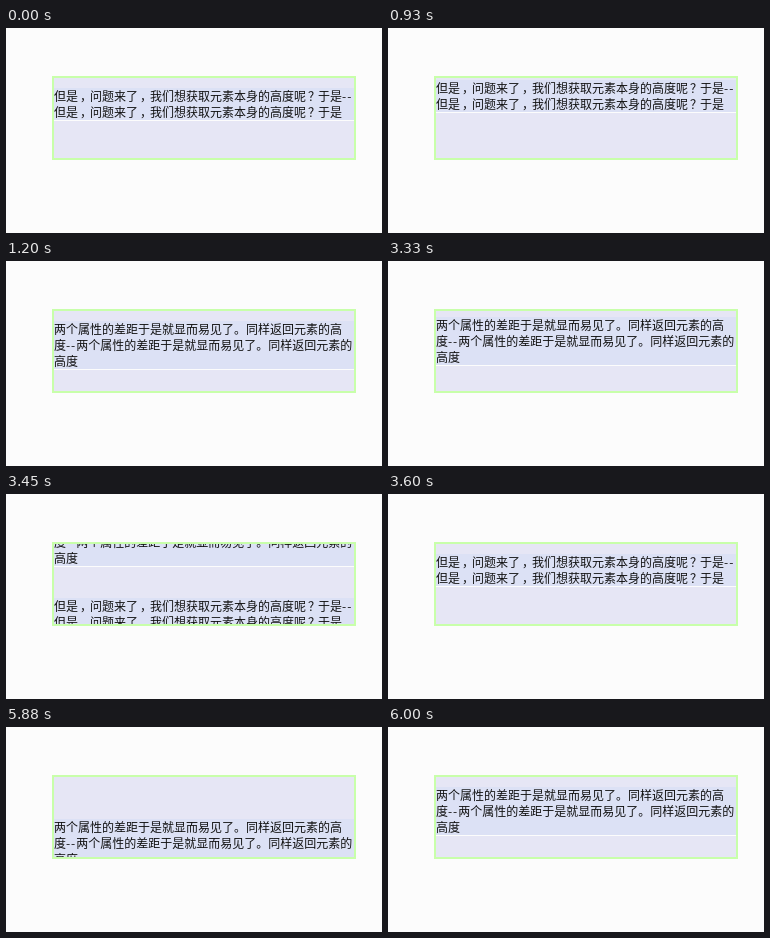
Recreate the animation shown at these times as an HTML page. Size 376 by 205 pixels, loop 8000 ms.

```html
<!DOCTYPE html>
<html lang="zh-CN">
<head>
<meta charset="utf-8">
<style>
html, body { margin: 0; width: 100%; height: 100%; overflow: hidden; background: #fcfcfc; }
#box {
  position: absolute; left: 46px; top: 48px; width: 300px; height: 80px;
  border: 2px solid #c8ffaa; background: #e6e6f5; overflow: hidden;
}
.item {
  position: absolute; left: 0; top: 10px; width: 300px;
  background: #dce1f5; border-bottom: 1px solid #fcfcfc; color: #111;
  font: 12px/16px "Noto Sans CJK SC", "Noto Sans CJK", sans-serif; white-space: pre;
}
.item i { font-style: normal; letter-spacing: .9px; }
/* Punctuation sits near the middle of its cell */
.item span { position: relative; left: 2px; }
</style>
</head>
<body>
<div id="box">
<div class="item">但是，问题来了，我们想获取元素本身的高度呢？于是<i>--</i>
但是，问题来了，我们想获取元素本身的高度呢？于是</div>
<div class="item">两个属性的差距于是就显而易见了。同样返回元素的高
度<i>--</i>两个属性的差距于是就显而易见了。同样返回元素的
高度</div>
</div>
<script>
const LOOP = 8000, TICK = 30, STEPS = 10, HEIGHT = 80;
const items = document.querySelectorAll('.item');
for (const item of items) {
  item.innerHTML = item.innerHTML.replace(/[，？]/g, '<span>$&</span>');
}
// Each scroll: start time and the distance of its first step
const scrolls = [[930, 8], [3330, 4], [5730, 4]];

function scrolled(t, [start, first]) {
  if (t < start) return 0;
  const k = Math.min(Math.floor((t - start) / TICK), STEPS - 1);
  return Math.round((first + (HEIGHT - first) * k / (STEPS - 1)) / 4) * 4;
}

function draw(now) {
  const t = now % LOOP;
  const total = scrolls.reduce((sum, s) => sum + scrolled(t, s), 0);
  const current = Math.floor(total / HEIGHT) % 2;
  const shift = total % HEIGHT;
  items[current].style.transform = `translateY(${-shift}px)`;
  items[1 - current].style.transform = `translateY(${HEIGHT - shift}px)`;
  requestAnimationFrame(() => draw(performance.now()));
}
draw(performance.now());
</script>
</body>
</html>
```
